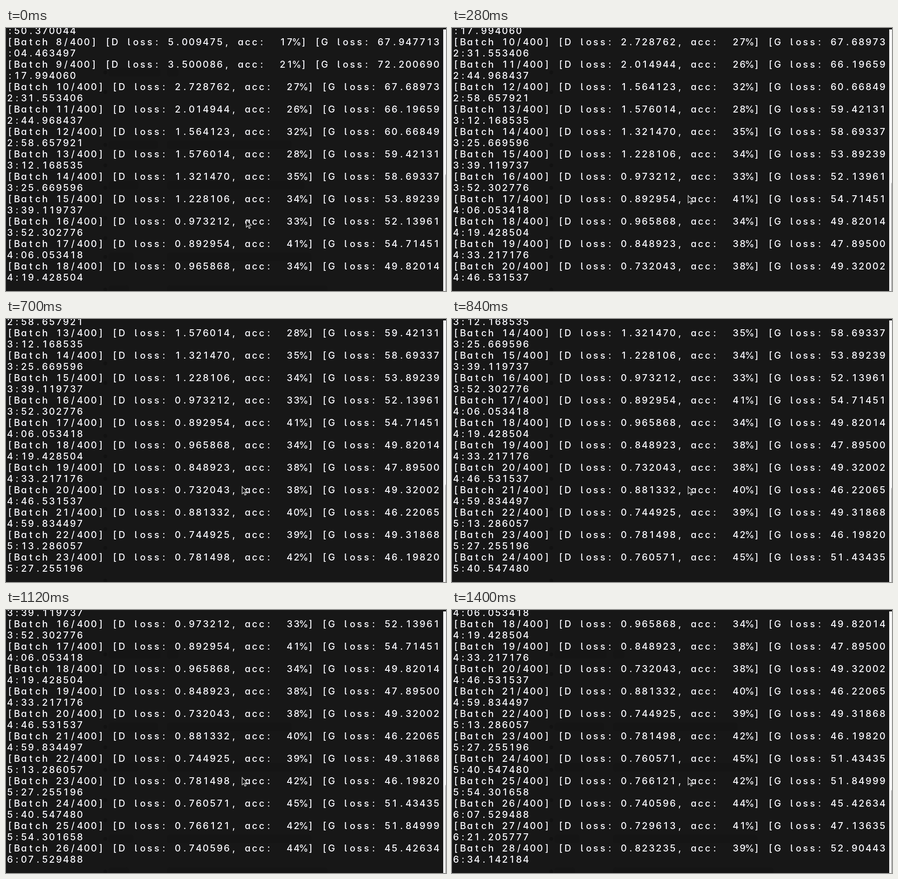
These frames come from a looping animation (944 by 563 pixels, 1540 ms). An HTML page:

```html
<!DOCTYPE html>
<html lang="en">
<head>
<meta charset="utf-8">
<title>Training log</title>
<style>
  html, body { margin: 0; height: 100%; overflow: hidden; background: #171717; }
  svg { display: block; }
  text {
    font: 500 20px Inter, "Open Sans", sans-serif;
    font-feature-settings: "cv05", "cv11", "calt" 0, "kern" 0;
    white-space: pre;
    text-anchor: middle;
    fill: #fafaff;
  }
</style>
</head>
<body>
<svg id="stage" width="944" height="563" viewBox="0 0 944 563">
  <rect width="944" height="563" fill="#171717"/>
  <g id="dots" fill="#121212"></g>
  <g id="smears" fill="#151515"></g>
  <svg width="938" height="545"><g id="log"></g></svg>
  <rect x="938" y="3" width="6" height="560" fill="#f4f4f4"/>
  <rect id="thumb" x="942" width="8" height="600" rx="3" fill="#bdbdbd"/>
  <path id="pointer" d="M0 0V16L3.6 12.7L6 18.5L8.6 17.4L6.2 11.7H11Z" fill="#171717" stroke="#e8e8e8" stroke-width="1.2"/>
</svg>
<script>
const STEP = 140, STEPS = 11;
const CELL = 15, ROW = 24, COLUMNS = 62;
const FIRST_BATCH = 8, LAST_BATCH = 28;

const $ = id => document.getElementById(id);

function add(parent, tag, attrs, content = "") {
  const node = document.createElementNS("http://www.w3.org/2000/svg", tag);
  for (const key in attrs) node.setAttribute(key, attrs[key]);
  node.textContent = content;
  $(parent).append(node);
}

// Seeded noise between -1 and 1
let seed = 7;
function noise() {
  seed = (seed * 16807) % 2147483647;
  return seed / 1073741823.5 - 1;
}

// One batch takes about 13.5 s; the wrapped line shows the end of the elapsed time
function elapsed(batch) {
  const total = 110.77 + 13.51 * (batch - 7) + 0.4 * noise();
  const seconds = (total % 60).toFixed(6).padStart(9, "0");
  const text = `${Math.floor(total / 60)}:${seconds}`;
  return batch < 10 ? text.slice(1) : text;
}

// Losses decay towards a floor while accuracy climbs
function report(batch) {
  const i = batch - FIRST_BATCH;
  const dLoss = (0.75 + 3.8 * Math.exp(-i / 3)) * (1 + 0.12 * noise());
  const accuracy = Math.round(44 - 25 * Math.exp(-i / 7) + 5 * noise());
  const gLoss = 47 + 25 * Math.exp(-i / 7) + 7 * noise();
  return `[Batch ${batch}/400] [D loss: ${dLoss.toFixed(6)}, acc:  ${accuracy}%] [G loss: ${gLoss.toFixed(6)}`
    .slice(0, COLUMNS);
}

const lines = [elapsed(FIRST_BATCH - 1)];
for (let batch = FIRST_BATCH; batch <= LAST_BATCH; batch++)
  lines.push(report(batch), elapsed(batch));

lines.forEach((line, row) => {
  const x = [...line].map((_, col) => 8.5 + col * CELL).join(" ");
  add("log", "text", { x, y: 13 + row * ROW }, line);
});

// Page showing faintly through the terminal
for (const cy of [95, 137, 250, 294, 342, 407, 450, 490, 560])
  add("dots", "circle", { cx: 213, cy, r: 4 });
for (const [y, label, value] of [[95, 112, 25], [250, 106, 268], [337, 64, 295], [490, 54, 310], [560, 44, 345]]) {
  add("smears", "rect", { x: 220, y: y - 9, width: label, height: 18, rx: 6 });
  add("smears", "rect", { x: 345, y: y - 9, width: value, height: 18, rx: 6 });
}

function draw(now) {
  const step = Math.floor(now / STEP) % STEPS;
  $("log").setAttribute("transform", `translate(0 ${-2 * ROW * step})`);
  $("thumb").setAttribute("y", Math.round(595 - 16356 / (58 + 2 * step)));
  $("pointer").setAttribute("transform", step < 2 ? "translate(515.5 410.5)" : "translate(506.5 358.5)");
  $("smears").setAttribute("opacity", step < 2 || step > 7 ? 1 : 0);
  requestAnimationFrame(draw);
}
draw(performance.now());
</script>
</body>
</html>
```
